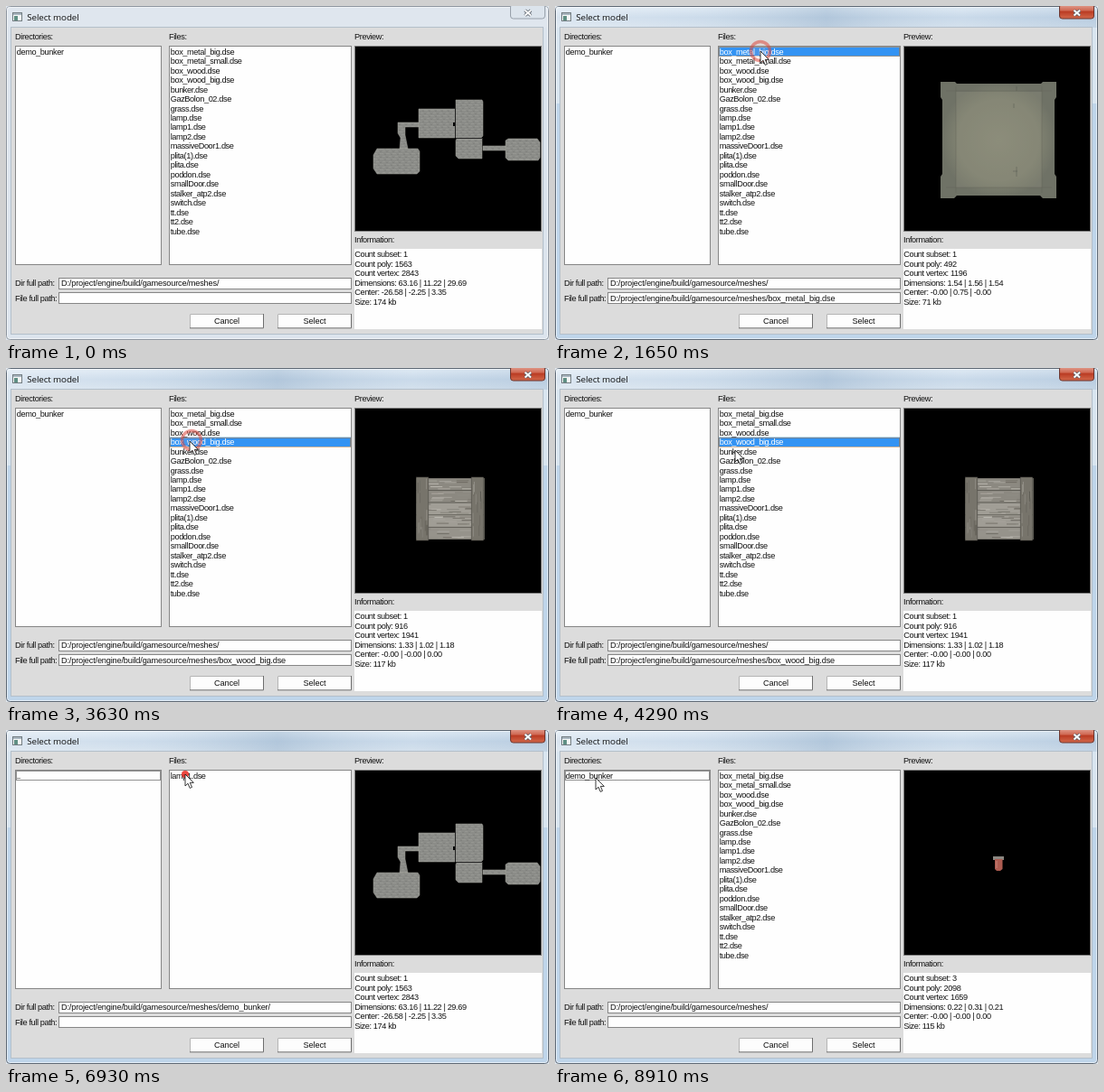
An HTML page for the animation above (9.24 s loop, 600 px wide and 370 px high).

```html
<!DOCTYPE html>
<html lang="en">
<head>
<meta charset="utf-8">
<title>Select model</title>
<style>
  html, body { margin: 0; width: 100%; height: 100%; overflow: hidden; background: #dfe5ec; }
  svg { display: block; width: 600px; height: 370px; }
  text { font: 9.2px "Liberation Sans", Arial, sans-serif; letter-spacing: -.39px; fill: #111; white-space: pre; }
  .path { letter-spacing: -.18px; }
  .title { font: 9.8px "Open Sans", "Noto Sans", sans-serif; letter-spacing: -.1px; }
  .mid { text-anchor: middle; letter-spacing: -.1px; }
  .on { fill: #fff; }
  .box { fill: #fefefe; stroke: #858585; }
  .focus { fill: none; stroke: #222; stroke-dasharray: 1 1; }
  .focus.warm { stroke: #b9742f; }
</style>
</head>
<body>
<svg id="stage" viewBox="0 0 600 370">
  <defs>
    <linearGradient id="bar" x2="0" y2="1">
      <stop stop-color="#d9e6f2"/><stop offset=".5" stop-color="#c0d3e6"/><stop offset="1" stop-color="#cddcea"/>
    </linearGradient>
    <linearGradient id="gloss">
      <stop stop-color="#fff" stop-opacity=".4"/><stop offset=".25" stop-color="#fff" stop-opacity=".2"/>
      <stop offset=".5" stop-color="#8fa9c2" stop-opacity=".3"/><stop offset=".75" stop-color="#fff" stop-opacity=".15"/>
      <stop offset="1" stop-color="#8fa9c2" stop-opacity=".15"/>
    </linearGradient>
    <linearGradient id="red" x2="0" y2="1">
      <stop stop-color="#e3a597"/><stop offset=".45" stop-color="#cf6650"/>
      <stop offset=".5" stop-color="#b93a22"/><stop offset="1" stop-color="#d3694b"/>
    </linearGradient>
    <radialGradient id="metal">
      <stop stop-color="#8a8b78"/><stop offset=".7" stop-color="#808271"/><stop offset="1" stop-color="#6f7266"/>
    </radialGradient>
    <pattern id="concrete" width="7" height="6" patternUnits="userSpaceOnUse">
      <path fill="#8b8c88" d="M0 0h7v6H0z"/>
      <path stroke="#959691" d="M0 1.5h4M3 4.5h3"/>
      <path stroke="#81827e" d="M5 2.5h2M0 5.5h2"/>
    </pattern>
  </defs>
  <g id="frame"></g>
  <g id="fixed"></g>
  <g id="scene"></g>
  <g id="ring"></g>
  <path id="cursor" d="M0 0V13L3 10.2 5.2 15.4 7.5 14.4 5.3 9.4H9.3Z" fill="#fff" stroke="#222" stroke-width=".9"/>
</svg>
<script>
const STEP = 330, STEPS = 28, PITCH = 10.46;
const ROOT = 'D:/project/engine/build/gamesource/meshes/';
const ROOT_FILES = ('box_metal_big box_metal_small box_wood box_wood_big bunker GazBolon_02 grass lamp lamp1 lamp2 ' +
  'massiveDoor1 plita(1) plita poddon smallDoor stalker_atp2 switch tt tt2 tube').split(' ');

const $ = id => document.getElementById(id);
const rect = (x, y, w, h, attrs = '') => `<rect x="${x}" y="${y}" width="${w}" height="${h}" ${attrs}/>`;
const shape = (d, attrs) => `<path d="${d}" ${attrs}/>`;
const text = (x, y, s, cls = '') => `<text x="${x}" y="${y}" class="${cls}">${s}</text>`;

function seeded(seed) {
  return () => (seed = (seed * 16807) % 2147483647) / 2147483647;
}

function crate(x, y, w, h) {
  const rnd = seeded(41), plank = h / 5;
  const grey = v => `fill="rgb(${v},${v - 3},${v - 11})"`;
  let out = rect(x + 2, y, w - 3, h, 'fill="#5a5851"');
  for (let i = 0; i < 5; i++) {
    const py = y + i * plank;
    out += rect(x + 2, py + .4, w - 4, plank - .9, grey(140 + rnd() * 30 | 0));
    for (let k = 0; k < 12; k++)
      out += rect(x + 3 + rnd() * w * .75, py + 1 + rnd() * (plank - 3), w * .17, 1, grey(105 + rnd() * 85 | 0));
  }
  for (const bx of [x + w * .03, x + w * .8]) {
    out += rect(bx, y - 1, w * .17, h + 2, 'fill="#77746b" stroke="#4d4b45" stroke-width=".6"');
    for (let k = 0; k < 14; k++)
      out += rect(bx + 1 + rnd() * w * .13, y + rnd() * h * .8, 1, h * .17, grey(90 + rnd() * 60 | 0));
  }
  return out;
}

function metalBox() {
  let out = shape('M426 84H442L444 86H537L539 84H554V101L552 104V186L554 189V213H539L536 210H444L441 213H426V189L428 186V104L426 101Z',
    'fill="url(#metal)"');
  out += rect(443, 95, 95, 106, 'fill="#8f907e" opacity=".35"');
  out += shape('M443 89V207M538 89V207M432 94H549M432 201H549', 'fill="none" stroke="#5f6257" stroke-width=".8" opacity=".5"');
  out += shape('M507 108v5M510 178v11M506 183h5M510 89v5', 'fill="none" stroke="#555b51" opacity=".5"');
  return out;
}

function smallBox() {
  const rnd = seeded(9);
  let out = rect(462, 136, 56, 25.5, 'fill="#62827e"');
  for (let i = 0; i < 22; i++)
    out += rect(463 + rnd() * 48, 137 + rnd() * 22, 2 + rnd() * 4, 1, `fill="${i % 2 ? '#769691' : '#506f6c'}" opacity=".5"`);
  return out;
}

const bunker = () => shape(
  'M410 158H455L457 161V183L454 186H410L406 180V165Z M435 158L436 146 433 141V129H456V134H441V143L444 158Z' +
  'M456 114H496V146H456Z M497 104H526L527 106V144L525 146H497Z M498 147H526V169H500L497 166V149Z' +
  'M527 155H552V160H527Z M555 147H587L590 151V168L588 171H555L552 168V149Z',
  'fill="url(#concrete)" stroke="#a0a19b" stroke-width=".5"') +
  shape('M496.5 106V146M497 146.5H527', 'stroke="#222"') +
  shape('M495 129v4', 'stroke="#000" stroke-width="2"');

const lamp = () => shape('M484 140H496V144H484Z', 'fill="#8b8781"') +
  shape('M486 143H494.5V154L492 156H488L486 154Z', 'fill="#ad5c51"') +
  shape('M488 145v8', 'stroke="#c9847a"');

// drawing, subsets, polygons, vertices, dimensions, center, size
const MODELS = {
  bunker: [bunker(), 1, 1563, 2843, '63.16 | 11.22 | 29.69', '-26.58 | -2.25 | 3.35', 174],
  box_metal_big: [metalBox(), 1, 492, 1196, '1.54 | 1.56 | 1.54', '-0.00 | 0.75 | -0.00', 71],
  box_metal_small: [smallBox(), 1, 1928, 2290, '1.01 | 0.37 | 0.46', '-0.00 | 0.18 | 0.13', 148],
  box_wood: [crate(466, 130, 48, 40), 1, 916, 1941, '0.82 | 0.68 | 0.74', '-0.00 | -0.00 | 0.00', 117],
  box_wood_big: [crate(451, 122, 79, 68), 1, 916, 1941, '1.33 | 1.02 | 1.18', '-0.00 | -0.00 | 0.00', 117],
  lamp1: [lamp(), 3, 2098, 1659, '0.22 | 0.31 | 0.21', '-0.00 | -0.00 | 0.00', 115]
};

const SCENES = [
  { at: 0, model: 'bunker' },
  { at: 5, model: 'box_metal_big', picked: true },
  { at: 7, model: 'box_metal_small', picked: true },
  { at: 10, model: 'box_wood', picked: true },
  { at: 11, model: 'box_wood_big', picked: true },
  { at: 15, model: 'bunker', picked: true },
  { at: 18, model: 'bunker', picked: true, dir: 'on' },
  { at: 19, model: 'bunker', inside: true, dir: 'focus' },
  { at: 22, model: 'lamp1', inside: true, picked: true },
  { at: 25, model: 'lamp1', inside: true, picked: true, dir: 'on' },
  { at: 26, model: 'lamp1', dir: 'focus' }
];

const CURSOR = [
  null, [330, 200], [270, 120], [235, 62], [227, 50], [227, 50], [227, 57],
  [228, 60], [213, 65], [208, 70], [205, 77], [203, 81], [201, 84], [199, 91],
  [199, 92], [170, 88], [90, 66], [42, 53], [42, 53], [60, 53], [150, 50],
  [198, 49], [198, 49], [150, 50], [45, 53], [45, 53], [45, 53], [45, 53]
];
const CLICKS = [[4, 227, 50], [6, 228, 59], [9, 208, 71], [10, 205, 80], [14, 199, 92], [18, 42, 52], [21, 198, 49], [24, 45, 52]];
const PHASES = [
  'r="4" fill="#e8281e" opacity=".85"',
  'r="10.5" fill="#f4b0a6" fill-opacity=".2" stroke="#dd4a3e" stroke-width="3.5" opacity=".55"',
  'r="14" fill="none" stroke="#e06a5e" stroke-width="1.6" opacity=".35"'
];

function list(x, w, items, chosen, state) {
  const top = 45.3 + chosen * PITCH;
  let out = '';
  if (state === 'on') {
    out += rect(x, top, w, PITCH, 'fill="#3393f3"') +
      rect(x + .5, Math.round(top) + .5, w - 1, 10, 'class="focus warm"');
  }
  if (state === 'focus') out += rect(x + .5, 45.5, w - 1, 10, 'class="focus"');
  items.forEach((s, i) => {
    out += text(x + .7, 53.8 + i * PITCH, s, state === 'on' && i === chosen ? 'on' : '');
  });
  return out;
}

function drawFrame(active) {
  let out = rect(.5, .5, 599, 369, `rx="4" fill="${active ? '#bfd5ea' : '#dce4ed'}" stroke="${active ? '#5d6874' : '#8e969f'}"`);
  out += rect(1, 1, 598, 23, `rx="3" fill="${active ? 'url(#bar)' : '#dfe6ee'}"`);
  if (active) out += rect(1, 24, 598, 84, 'fill="#d9e5f0"') + rect(1, 1, 598, 23, 'fill="url(#gloss)"');
  out += rect(1.5, 1.5, 597, 367, 'rx="3" fill="none" stroke="#fff" opacity=".55"');
  out += rect(557.5, -2, 38, 16, `rx="3" fill="${active ? 'url(#red)' : '#dce4ec'}" stroke="${active ? '#6b352e' : '#97a0aa'}"`);
  for (const [color, width] of [['#59616b', 3.6], ['#fff', 2]])
    out += shape('M573.5 4.8L580 10.5M580 4.8L573.5 10.5', `stroke="${color}" stroke-width="${width}"`);
  return out;
}

function button(x, label) {
  return rect(x, 341, 82, 16, 'fill="#fdfdfd"') +
    shape(`M${x + .5} 357V341.5H${x + 81}`, 'fill="none" stroke="#b5b5b5"') +
    shape(`M${x} 356.8H${x + 81.5}V341`, 'fill="none" stroke="#6d6d6d"') +
    text(x + 41, 352.4, label, 'mid');
}

function drawFixed() {
  let out = rect(5.5, 23.5, 588, 340, 'fill="#dcdcdc" stroke="#b3bfca"');
  out += rect(7.5, 7.5, 10, 9, 'fill="#f5f7f6" stroke="#737d82"') +
    rect(8, 8, 9, 2, 'fill="#a9b6c0"') + rect(9, 11, 4, 5, 'fill="#5f8f84"');
  out += text(23.3, 15.6, 'Select model', 'title');
  const labels = [[10, 37, 'Directories:'], [180, 37, 'Files:'], [385, 37, 'Preview:'],
    [385, 261.5, 'Information:'], [10, 310.4, 'Dir full path:'], [10, 326.6, 'File full path:']];
  for (const label of labels) out += text(...label);
  const boxes = [[10, 44, 161, 242], [180, 44, 201, 242], [58, 301, 323, 12], [58, 317, 323, 12]];
  for (const [x, y, w, h] of boxes) out += rect(x + .5, y + .5, w, h, 'class="box"');
  out += rect(385, 44, 207, 206, 'fill="#808080"') + rect(386, 45, 205, 204);
  out += rect(385, 269, 207, 89, 'fill="#fefefe"');
  return out + button(203, 'Cancel') + button(300, 'Select');
}

function drawScene({ model, picked, inside, dir }) {
  const names = inside ? ['lamp1'] : ROOT_FILES;
  const folder = ROOT + (inside ? 'demo_bunker/' : '');
  const [art, subsets, polys, verts, dims, center, size] = MODELS[model];
  const info = ['Count subset: ' + subsets, 'Count poly: ' + polys, 'Count vertex: ' + verts,
    'Dimensions: ' + dims, 'Center: ' + center, `Size: ${size} kb`];
  return list(11, 160, [inside ? '..' : 'demo_bunker'], 0, dir) +
    list(181, 200, names.map(n => n + '.dse'), names.indexOf(model), picked ? 'on' : '') +
    text(61, 310.4, folder, 'path') +
    (picked ? text(61, 326.6, folder + model + '.dse', 'path') : '') +
    art + info.map((s, i) => text(385.2, 278.3 + i * 10.5, s)).join('');
}

let shown = -1;
function show(step) {
  if (step === shown) return;
  shown = step;
  $('frame').innerHTML = drawFrame(step > 0);
  $('scene').innerHTML = drawScene(SCENES.filter(s => s.at <= step).pop());
  const click = CLICKS.filter(c => c[0] <= step).pop();
  const phase = click && PHASES[step - click[0]];
  $('ring').innerHTML = phase ? `<circle cx="${click[1]}" cy="${click[2]}" ${phase}/>` : '';
  const pos = CURSOR[step];
  $('cursor').setAttribute('visibility', pos ? 'visible' : 'hidden');
  if (pos) $('cursor').setAttribute('transform', `translate(${pos})`);
}

$('fixed').innerHTML = drawFixed();
const start = performance.now();
function tick() {
  show(Math.floor((performance.now() - start) / STEP) % STEPS);
  requestAnimationFrame(tick);
}
tick();
</script>
</body>
</html>
```
